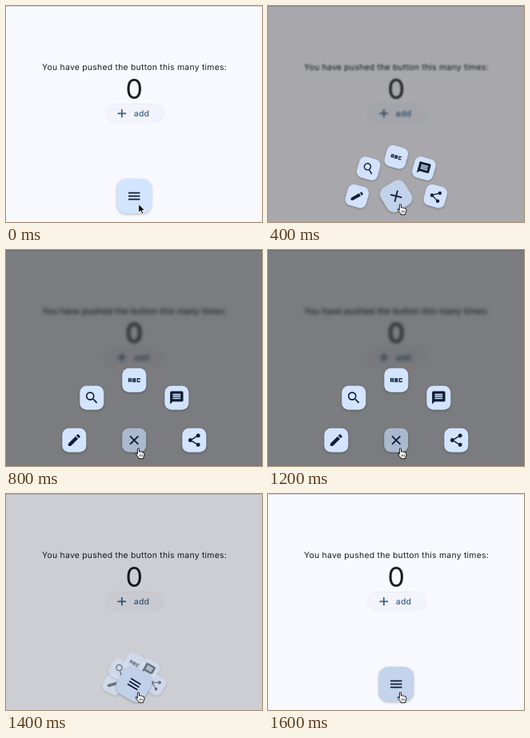
Animation, 320 px wide and 270 px high, one loop 1730 ms. Source, as an HTML page:

```html
<!DOCTYPE html>
<html lang="en">
<head>
<meta charset="utf-8">
<style>
  html, body { margin: 0; width: 100%; height: 100%; overflow: hidden; background: #f8f9ff; }
  svg { display: block; width: 100vw; height: 100vh; }
  text { font-family: Inter, Roboto, sans-serif; text-anchor: middle; fill: #191c20; }
  .label { font-size: 10.4px; letter-spacing: .25px; text-rendering: geometricPrecision; }
  .raised { filter: drop-shadow(0 1.8px 1.6px rgba(0, 0, 0, .28)); }
  .pill { fill: #f3f4fb; filter: drop-shadow(0 .8px .5px rgba(0, 0, 0, .2)); }
  .icon { fill: #0e1d34; }
  .line { fill: none; stroke: #0e1d34; stroke-width: 2.2; }
</style>
</head>
<body>
<svg viewBox="0 0 320 270">
  <rect width="320" height="270" fill="#f8f9ff"/>
  <rect width="320" height="1" fill="#d3d4d9"/>
  <g id="page">
    <text class="label" x="160.5" y="79.5">You have pushed the button this many times:</text>
    <text x="160.2" y="116" font-size="34">0</text>
    <rect class="pill" x="124.5" y="122.5" width="73" height="23.5" rx="11.75"/>
    <path d="M139.5 134.3h10.6M144.8 129v10.6" stroke="#36618e" stroke-width="1.7"/>
    <text class="label" x="169.5" y="138" font-weight="500" style="fill:#36618e">add</text>
  </g>
  <rect id="shade" width="320" height="270"/>
  <g id="items"></g>
  <g class="raised" transform="translate(160.2 237.7)">
    <g id="main">
      <rect id="face"/>
      <path id="menu" class="line" transform="scale(.8)" d="M-9-5H9M-9 0H9M-9 5H9"/>
      <path id="cross" class="line" transform="scale(.82)" d="M-6.3-6.3L6.3 6.3M6.3-6.3L-6.3 6.3"/>
    </g>
  </g>
  <path id="arrow" transform="translate(165.8 247.6)" fill="#000" stroke="#fff" stroke-width=".8"
    d="M0 0V10.6L2.5 8.4L4.2 12.3L6 11.5L4.3 7.7H7.6Z"/>
  <g id="hand" transform="translate(161.4 247.3)" stroke="#000" stroke-width=".9" stroke-linejoin="round">
    <path fill="#fff" d="M3 8V1.7Q3 .5 4 .5T5.1 1.7V5Q6.2 4 7.2 5.2Q8.4 4.5 9.2 5.7Q11.4 5.3 11.4 7.2V9.2Q11.2 10.8 10.3 12V13.5H4.5V12.3Q3 10.9 1 7.8Q.2 6.5 1.2 6.2Q2 6.1 3 8Z"/>
    <path d="M5.8 8.3v2.7M7.4 8.3v2.7M9 8.3v2.7" stroke-width=".6"/>
  </g>
</svg>
<script>
const LOOP = 1730, STEP = 1000 / 15, SPREAD = 75;
const $ = id => document.getElementById(id);
const clamp = x => Math.min(1, Math.max(0, x));
const mix = (a, b, k) => a + (b - a) * k;

const icons = [
  '<path class="icon" d="M3 17.25V21h3.75L17.81 9.94l-3.75-3.75zM20.71 7.04a1 1 0 0 0 0-1.41l-2.34-2.34a1 1 0 0 0-1.41 0l-1.83 1.83 3.75 3.75z"/>',
  '<path class="icon" d="M15.5 14h-.79l-.28-.27A6.47 6.47 0 0 0 16 9.5 6.5 6.5 0 1 0 9.5 16c1.61 0 3.09-.59 4.23-1.57l.27.28v.79l5 4.99L20.49 19zm-6 0a4.5 4.5 0 1 1 0-9 4.5 4.5 0 0 1 0 9z"/>',
  '<path class="line" style="stroke-width:1.6" d="M3.75 15V9.75h3.5V15M3.75 12.75h3.5M10.25 9.75h3.2v4.5h-3.2zM10.25 12h3.2M20.25 11V9.75h-3.5v4.5h3.5V13"/>',
  '<path class="icon" d="M20 2H4a2 2 0 0 0-2 2v18l4-4h14a2 2 0 0 0 2-2V4a2 2 0 0 0-2-2zm-2 12H6v-2h12zm0-3H6V9h12zm0-3H6V6h12z"/>',
  '<path class="icon" d="M18 16.08c-.76 0-1.44.3-1.96.77L8.91 12.7a3 3 0 0 0 0-1.4l7.05-4.11A3 3 0 1 0 15 5c0 .24.04.47.09.7L8.04 9.81a3 3 0 1 0 0 4.38l7.12 4.16a2.92 2.92 0 1 0 2.84-2.27z"/>'
];
$('items').innerHTML = icons.map(icon => `<g class="raised"><g>
  <rect x="-15" y="-15" width="30" height="30" rx="8.5" fill="#d3e4ff"/>
  <g transform="scale(.82) translate(-12 -12)">${icon}</g></g></g>`).join('');
const items = [...$('items').children];

// cubic-bezier(.4, 0, .2, 1)
function ease(x) {
  if (x <= 0 || x >= 1) return clamp(x);
  let lo = 0, hi = 1, s;
  for (let i = 0; i < 20; i++) {
    s = (lo + hi) / 2;
    const at = 1.2 * (1 - s) ** 2 * s + .6 * (1 - s) * s * s + s ** 3;
    if (at < x) lo = s; else hi = s;
  }
  return s * s * (3 - 2 * s);
}

function set(el, attrs) {
  for (const key in attrs) el.setAttribute(key, attrs[key]);
}

function draw(t) {
  const closing = t >= 1200;
  const p = ease(closing ? 1 - (t - 1223) / 250 : (t - 295) / 250);
  const pressed = t >= 265;

  const blur = 2.3 * clamp((p - .4) / .6);
  $('page').style.filter = blur ? `blur(${blur}px)` : 'none';
  set($('shade'), { opacity: p / 2 });

  items.forEach((item, i) => {
    const angle = Math.PI * (1 - i / 4);
    const x = 160.3 + Math.cos(angle) * SPREAD * p;
    const y = 237.7 - Math.sin(angle) * SPREAD * p;
    set(item, { transform: `translate(${x} ${y})`, opacity: clamp(p * 1.5) });
    set(item.firstChild, { transform: `rotate(${45 * (1 - p)}) scale(${mix(.7, 1, p)})` });
  });

  const size = mix(43.5, 30, p);
  const light = 1 - mix(closing ? .07 : 0, .19, p * p);
  const fill = `rgb(${[211, 228, 255].map(c => Math.round(c * light))})`;
  set($('face'), { x: -size / 2, y: -size / 2, width: size, height: size, rx: size * .28, fill });
  set($('main'), { transform: `rotate(${90 * p})` });
  set($('menu'), { opacity: p < .5 ? 1 : 0 });
  set($('cross'), { opacity: p < .5 ? 0 : 1 });
  set($('arrow'), { opacity: pressed ? 0 : 1 });
  set($('hand'), { opacity: pressed ? 1 : 0 });
}

const start = performance.now();
function tick() {
  const t = (performance.now() - start) % LOOP;
  draw(Math.floor((t + 5) / STEP) * STEP);
  requestAnimationFrame(tick);
}
tick();
</script>
</body>
</html>
```
